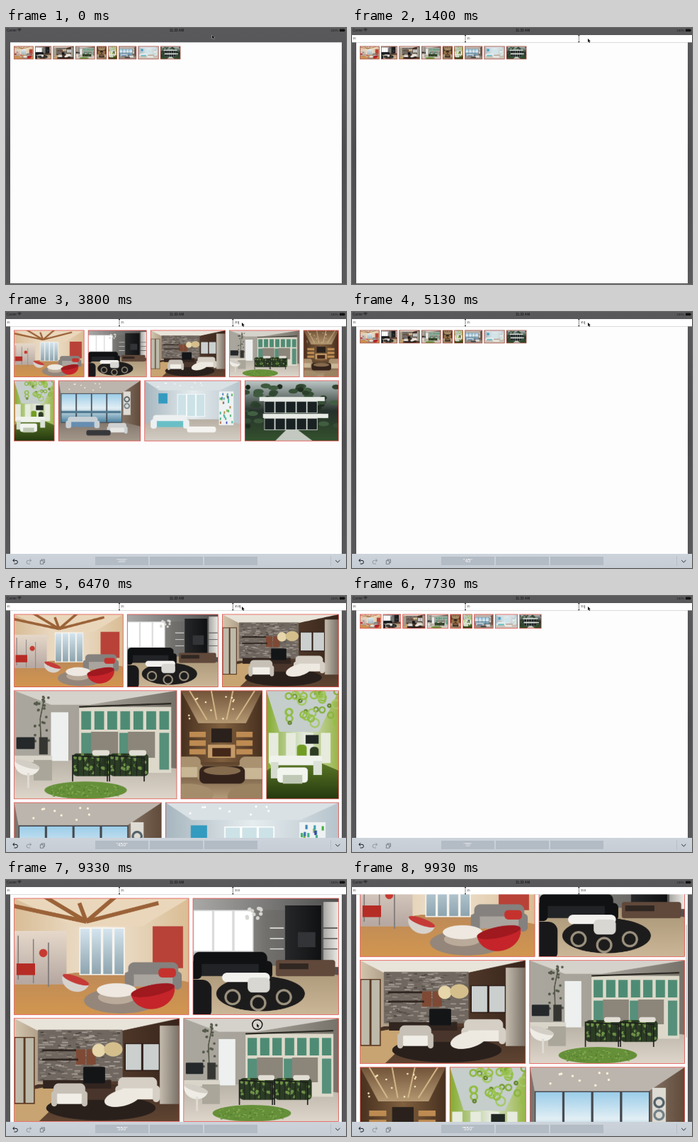
Animation of 480x362 px, one loop 9990 ms. Source, as an HTML page with a canvas:

```html
<!DOCTYPE html>
<html lang="en">
<head>
<meta charset="utf-8">
<title>Photo grid</title>
<style>
html, body { margin: 0; width: 100%; height: 100%; overflow: hidden; background: #555557; }
canvas { display: block; width: 480px; height: 362px; }
</style>
</head>
<body>
<canvas id="stage"></canvas>
<script>
const LOOP = 9990, DENSITY = Math.max(1, window.devicePixelRatio || 1);
const stage = document.getElementById('stage');
stage.width = 480 * DENSITY;
stage.height = 362 * DENSITY;
const screen = stage.getContext('2d');
let g = screen;

const clamp = v => Math.min(1, Math.max(0, v));
const ease = v => { v = clamp(v); return v * v * (3 - 2 * v); };
const mix = (a, b, k) => a + (b - a) * k;
const times = (n, fn) => { for (let i = 0; i < n; i++) fn(i); };

// drawing helpers, all acting on the current context
const box = (c, x, y, w, h) => { g.fillStyle = c; g.fillRect(x, y, w, h); };
const soft = (c, x, y, w, h, r) => {
  g.beginPath(); g.roundRect(x, y, w, h, r); g.fillStyle = c; g.fill();
};
const oval = (c, x, y, rx, ry = rx, tilt = 0) => {
  g.beginPath(); g.ellipse(x, y, rx, ry, tilt, 0, 7); g.fillStyle = c; g.fill();
};
const ring = (c, width, x, y, r, from = 0, to = 7) => {
  g.beginPath(); g.arc(x, y, r, from, to);
  g.strokeStyle = c; g.lineWidth = width; g.stroke();
};
const path = p => {
  g.beginPath();
  for (let i = 0; i < p.length; i += 2) g.lineTo(p[i], p[i + 1]);
};
const poly = (c, ...p) => { path(p); g.fillStyle = c; g.fill(); };
const line = (c, width, ...p) => { path(p); g.strokeStyle = c; g.lineWidth = width; g.stroke(); };
const shade = (x0, y0, x1, y1, ...colors) => {
  const s = g.createLinearGradient(x0, y0, x1, y1);
  colors.forEach((c, i) => s.addColorStop(i / (colors.length - 1), c));
  return s;
};
const text = (s, x, y, size, c, align = 'left', weight = 400) => {
  g.font = `${weight} ${size}px "Liberation Sans", Arial, sans-serif`;
  g.textAlign = align; g.textBaseline = 'middle'; g.fillStyle = c;
  g.fillText(s, x, y);
};
function scatter(n, x, y, w, h, draw) {
  let seed = 77;
  const random = () => (seed = seed * 16807 % 2147483647) / 2147483647;
  random();
  times(n, () => draw(x + random() * w, y + random() * h, random()));
}

// interiors: every picture is 100 units high
function shell(w, [l, r, top, base], ceiling, wall, floor) {
  box(shade(0, 0, w, 0, ...wall), 0, 0, w, 100);
  poly(ceiling, 0, 0, w, 0, r, top, l, top);
  poly(shade(0, base, 0, 100, ...floor), l, base, r, base, w, base + 8, w, 100, 0, 100, 0, base + 8);
}
function panes(n, frame, glass, x, y, w, h) {
  box(frame, x, y, w, h);
  const step = w / n;
  times(n, i => box(glass, x + i * step + 1, y + 1, step - 2, h - 2));
}
function sofa(c, seat, x, y, w, h) {
  soft(c, x + w * .06, y, w * .88, h * .7, h * .2);
  soft(seat, x + w * .1, y + h * .4, w * .8, h * .4, h * .12);
  soft(c, x, y + h * .3, w * .16, h * .6, h * .15);
  soft(c, x + w * .84, y + h * .3, w * .16, h * .6, h * .15);
}
function bowl(c, inner, x, y, r, tilt) {
  g.beginPath(); g.ellipse(x, y, r, r * .85, tilt, 0, Math.PI); g.fillStyle = c; g.fill();
  oval(inner, x, y, r, r * .25, tilt);
}
const lamps = (n, c, x, y, w, h, r = 1) => scatter(n, x, y, w, h, (a, b) => oval(c, a, b, r));

function redLoft(w) {
  shell(w, [52, 110, 24, 64], '#ead7bb', ['#d9bd96', '#f0e4d3', '#d9bd94'], ['#bd8a58', '#d2964f']);
  times(5, i => line('#9b6238', 3.5, 62, 20, i * 34 - 12, 4 - i % 2 * 8));
  box(shade(0, 25, 0, 72, '#e9dccd', '#b7a9a2'), 0, 28, 45, 46);
  times(3, i => box('#827d7b', 3 + i * 13, 32 + i * 3, 1, 38));
  box('#b52c25', 2, 56, 16, 10); oval('#c63a31', 25, 47, 3.5);
  panes(4, '#f8f5ef', shade(0, 26, 0, 66, '#d5e5ef', '#8ba2ac'), 56, 25, 39, 41);
  box('#b84238', 119, 24, 26, 36);
  oval('#94867a', 92, 88, 32, 11);
  sofa('#85817e', '#aaa49e', 95, 55, 49, 26);
  soft('#c5322e', 124, 60, 15, 8, 3);
  oval('#b9aa9a', 88, 85, 16, 6); oval('#eee8e1', 88, 79, 17, 6);
  bowl('#d8d2cd', '#c53a37', 53, 70, 12, .35);
  bowl('#c5242a', '#9f191f', 119, 79, 19, -.2);
}
function blackLounge(w) {
  shell(w, [0, 80, 10, 58], shade(0, 0, w, 0, '#aaa9a7', '#4c4c4b'), ['#c5c4c1', '#72716e', '#515150'], ['#a99677', '#cbb798']);
  panes(3, '#d9dadb', '#fff', 0, 10, 52, 36);
  box(shade(79, 0, 110, 0, '#272829', '#101112'), 79, 6, 31, 50);
  box(shade(112, 0, w, 0, '#a8a7a3', '#efede8'), 112, 3, 13, 56);
  times(3, i => { box('#ddd', 66, 25 + i * 9, 12, 1); box('#555', 112, 25 + i * 9, 12, 1); });
  box('#323437', 90, 29, 15, 13);
  soft('#60483a', 71, 53, 51, 14, 2); box('#302722', 74, 56, 25, 5);
  sofa('#101113', '#222326', -4, 46, 72, 26);
  oval('#1d1c1c', 58, 82, 38, 15);
  times(3, i => ring('#9c927f', 2, 34 + i * 22, 85 + i % 2 * 5, 6));
  soft('#18181a', -8, 70, 24, 34, 8);
  soft('#f2f1ee', 25, 64, 41, 8, 4); soft('#d9d7d2', 47, 68, 19, 13, 4);
  lamps(11, '#d7d6d2', 46, 8, 18, 9, 1.6);
}
function stoneDen(w) {
  shell(w, [23, 104, 12, 64], '#e9e4da', ['#d4c6ae', '#59402f', '#37241b'], ['#443126', '#604532']);
  poly('#c7a471', 0, 72, 34, 66, 55, 70, 24, 100, 0, 100);
  panes(2, '#5a3823', '#bdbaaa', 0, 18, 20, 65);
  box('#706860', 23, 11, 82, 50);
  scatter(260, 23, 11, 78, 48, (x, y, r) => box(`hsl(30 8% ${24 + r * 40}%)`, x, y, 3 + r * 3, 1.2));
  panes(2, '#2b1a13', '#cbd0cf', 107, 24, 34, 27);
  box(shade(141, 0, w, 0, '#c5bcae', '#777066'), 141, 7, 20, 76);
  times(2, i => { box('#302621', 27, 30 + i * 9, 35, 2); box('#7e4a35', 60 + i * 10, 30, 9, 15); });
  box('#322520', 28, 60, 66, 8); soft('#141517', 67, 47, 21, 16, 1);
  oval('#e6d6aa', 82, 31, 6.5); oval('#d4bf8c', 96, 30, 9, 7);
  oval('#29201c', 84, 87, 53, 12);
  soft('#49352b', 66, 69, 34, 10, 3);
  sofa('#d5cfc5', '#eeeae2', 98, 57, 43, 27);
  sofa('#c7c0b6', '#f1eee8', 36, 63, 35, 25);
  oval('#eee9e0', 105, 77, 18, 8, -.25);
}
function greenBedroom(w) {
  shell(w, [34, 70, 13, 64], '#d5d2cb', ['#aaa79f', '#a6a198', '#767269'], ['#b9b2a7', '#ded6ca']);
  box('#edf0ee', 34, 20, 16, 45);
  line('#4c4c3d', 1, 25, 55, 24, 26, 28, 6);
  scatter(24, 19, 5, 13, 42, (x, y) => oval('#55594a', x, y, 1.2));
  box('#ddd9ca', 60, 15, 85, 61); line('#2b2923', 1.5, 60, 15, 145, 12);
  times(7, i => box('#4e8b74', 62 + i * 12, 19, 9, 17));
  for (const x of [62, 97, 134]) box('#568f7a', x, 39, 9, 34);
  times(2, i => {
    const x = 54 + i * 34;
    box('#8b857a', x + 17, 38, 25, 24);
    soft('#2b3c24', x, 58, 36, 21, 4);
    scatter(45, x + 2, 59, 32, 17, (a, b, r) => oval(r > .5 ? '#6d9148' : '#263620', a, b, 1.5));
    soft('#e2ded5', x + 18, 55, 16, 5, 2);
    times(7, n => line('#20211e', .7, x + n * 5, 61, x + n * 5, 79));
    line('#1c1d1a', 1.1, x, 84, x, 60, x + 32, 62, x + 32, 84);
  });
  box('#d9d5c9', 0, 60, 35, 6); box('#aaa69a', 18, 64, 17, 19);
  soft('#24282a', 2, 43, 17, 11, 1); box('#353632', 23, 43, 8, 16);
  bowl('#eeece5', '#d2cec5', 12, 68, 12, .3); box('#dedbd4', 12, 76, 2, 14);
  oval('#659039', 66, 92, 38, 8);
  scatter(90, 34, 87, 62, 10, (x, y, r) => box(r > .5 ? '#83a951' : '#557d2e', x, y, 1.5, 1));
}
function amberHall(w) {
  shell(w, [16, 60, 30, 66], shade(0, 0, 0, 30, '#715338', '#b49872'), ['#47301f', '#80603f', '#47301f'], ['#5e432c', '#b49d7b']);
  times(4, i => line('#d6b98a', 1.2, 8 + i * 20, 0, 24 + i * 9, 27));
  lamps(12, '#fff0c4', 6, 4, 62, 22, .8);
  for (const x of [8, 51]) times(3, i => box('#bd8b52', x, 38 + i * 8, 15, 5));
  box('#2a211c', 28, 35, 19, 13); box('#c49b68', 25, 50, 25, 12); box('#432719', 29, 53, 17, 8);
  sofa('#a99170', '#c8b694', -10, 61, 30, 24); sofa('#aa9271', '#c9b695', 52, 61, 34, 26);
  soft('#33231b', 17, 70, 42, 16, 5); oval('#856b4d', 38, 74, 17, 4);
  oval('#a58d6c', 6, 96, 24, 10); oval('#9a815f', 67, 98, 24, 12);
}
function greenOffice(w) {
  shell(w, [12, 48, 38, 66], '#c5cecb', ['#83ab2d', '#dfe6d7', '#97b446'], ['#5b7826', '#24380f']);
  scatter(32, 20, 0, 46, 30, (x, y, r) => ring(`hsl(82 48% ${32 + r * 28}%)`, 1.5, x, y, 1 + r * 3));
  times(4, i => box('#e6ebdd', i * 16 + 2, 39, 9, 28));
  box('#202723', 36, 41, 12, 8);
  soft('#729d24', 28, 50, 9, 14, 3); soft('#2e3c22', 40, 52, 8, 13, 3);
  soft('#f0f3ec', 3, 60, 48, 9, 2); box('#d5dcce', 4, 66, 7, 15); box('#dce2d7', 43, 65, 8, 13);
  soft('#f2f4ee', 10, 71, 28, 14, 3); box('#bfc8b4', 15, 78, 18, 8);
}
function seaView(w) {
  shell(w, [4, 104, 21, 68], '#bcb5ad', ['#77746f', '#aaa49c', '#614a39'], ['#83776d', '#a5988b']);
  lamps(9, '#fff4dc', 16, 4, 78, 12);
  panes(4, '#42454b', shade(0, 22, 0, 69, '#9bcde9', '#e2eff5', '#4c829f'), 4, 21, 101, 49);
  box('#4f7890', 5, 50, 98, 4);
  box('#dedbd4', 107, 18, 12, 39); ring('#506069', 2, 113, 31, 4); ring('#718087', 2, 113, 42, 4);
  sofa('#c8d0d5', '#668db1', 12, 60, 56, 21); sofa('#cfd1d1', '#e6e6e4', 80, 70, 34, 20);
  soft('#37383b', 46, 82, 40, 9, 3);
}
function whiteStudio(w) {
  shell(w, [24, 124, 16, 64], '#d9e1e5', ['#a7b6bf', '#e6edef', '#b7c4cc'], ['#b9b0a4', '#d4cec5']);
  lamps(9, '#fff', 20, 3, 110, 8);
  box('#339bc0', 23, 21, 15, 17);
  panes(3, '#fff', '#cce2e7', 54, 22, 46, 38);
  box('#eef2f3', 123, 18, 24, 56);
  scatter(28, 124, 20, 20, 48, (x, y, r) => box(`hsl(${r * 240} 48% 46%)`, x, y, 2, 4));
  sofa('#edf0f1', '#69bfc7', 10, 57, 64, 25); soft('#f4f3f0', 70, 76, 48, 10, 4);
}
function darkVilla(w) {
  box(shade(0, 0, 0, 100, '#bdc8c7', '#26312b', '#34522e'), 0, 0, w, 100);
  scatter(60, 0, 8, w, 68, (x, y, r) => oval(`hsl(120 18% ${12 + r * 20}%)`, x, y, 4 + r * 5, 4));
  times(2, i => {
    box('#e8ebe6', 24 + i * 6, 27 + i * 28, 108, 7);
    panes(5, '#dadfd9', '#192122', 32, 34 + i * 28, 88, 20);
  });
  poly('#c3c8c0', 50, 100, 68, 82, 88, 82, 112, 100);
}

const rooms = [
  [redLoft, 1.5], [blackLounge, 1.25], [stoneDen, 1.6], [greenBedroom, 1.5], [amberHall, .75],
  [greenOffice, .665], [seaView, 1.355], [whiteStudio, 1.59], [darkVilla, 1.55]
].map(([paint, ratio]) => {
  const image = document.createElement('canvas');
  image.width = 300 * ratio; image.height = 300;
  g = image.getContext('2d');
  g.scale(3, 3);
  paint(100 * ratio);
  return { image, ratio };
});
g = screen;

// layouts: one small row, or rows stretched to the full width
const LEFT = 11.5, TOP = 26, WIDE = 458;
function placeRow(row, y, height, gap) {
  let x = LEFT;
  return row.map(({ ratio }) => {
    const cell = [x, y, ratio * height, height];
    x += ratio * height + gap;
    return cell;
  });
}
function justified(counts) {
  let y = TOP, first = 0;
  return counts.flatMap(n => {
    const row = rooms.slice(first, first += n);
    const h = (WIDE - 6 * (n - 1)) / row.reduce((sum, r) => sum + r.ratio, 0);
    const cells = placeRow(row, y, h, 6);
    y += h + 5.3;
    return cells;
  });
}

// each round types a height, shows the grid, then erases the number again
const round = (word, start, pace, erase, thumb, counts) => ({
  word, start, pace, erase, full: start + pace * 2,
  small: placeRow(rooms, TOP, thumb, 3), large: justified(counts)
});
const rounds = [
  round('200', 2470, 250, 3800, 17.9, [5, 4]),
  round('450', 4400, 465, 6600, 17.9, [3, 3, 2, 1]),
  round('550', 7330, 320, Infinity, 19.7, [2, 2, 3, 2])
];
const roundAt = t => rounds.findLast(r => r.start <= t) || rounds[0];
function valueAt(t) {
  const { word, start, pace, erase } = roundAt(t);
  const typed = Math.min(word.length, Math.floor((t - start) / pace) + 1);
  const erased = Math.max(0, Math.floor((t - erase) / 170) + 1);
  return word.slice(0, Math.max(0, typed - erased));
}

function drawGallery(t, scroll) {
  const { small, large, full, erase } = roundAt(t);
  const grown = ease((t - full) / 330) - ease((t - erase) / 330);
  g.save();
  g.beginPath(); g.rect(6, 20, 468, 341); g.clip();
  g.imageSmoothingQuality = 'high';
  rooms.forEach(({ image }, n) => {
    const [x, y, w, h] = small[n].map((v, j) => mix(v, large[n][j], grown));
    g.drawImage(image, x, y - scroll, w, h);
    g.strokeStyle = h > 19 ? '#e4504a' : '#a54a3c';
    g.lineWidth = .8;
    g.strokeRect(x, y - scroll, w, h);
  });
  g.restore();
}

function drawStatus() {
  text('Carrier', 1, 3.4, 4.6, '#1d1d1f');
  times(3, i => ring('#1d1d1f', .8, 19, 5, 1.2 + i * 1.4, -2.35, -.8));
  text('11:33 AM', 241, 3.4, 4.6, '#1d1d1f', 'center', 700);
  text('100%', 469.5, 3.4, 4.4, '#1d1d1f', 'right');
  soft('#111', 471, 1.5, 7, 3.6, .6); box('#111', 478.3, 2.5, .7, 1.6);
}

function drawFields(t) {
  const value = valueAt(t);
  g.globalAlpha = ease((t - 930) / 350);
  box('#fff', 0, 10, 480, 10.3);
  ['15', '15', value].forEach((s, i) => {
    text(s, i * 161 + 1, 15.3, 4.2, '#333');
    if (!i) return;
    const x = i * 160.3 - .3;
    box('#707072', x - .4, 10, .8, 10);
    for (const y of [10, 19]) box('#333', x - 1, y, 2, 1.2);
  });
  const blink = t < 2470 ? t > 1800 && t < 2270 : t < 9270;
  if (blink) box('#444', 323.4 + value.length * 2.34, 13, .7, 4.5);
  g.globalAlpha = 1;
}

function hookArrow(x, dir, c) {
  g.save();
  g.translate(x, 351.3); g.scale(dir, 1);
  line(c, 1, -3, 0, 1, 0);
  ring(c, 1, 1, 2.4, 2.4, -Math.PI / 2, Math.PI / 2);
  line(c, 1, 1, 4.8, -1.5, 4.8);
  line(c, 1, -1, -2.2, -3.3, 0, -1, 2.2);
  g.restore();
}

function drawKeyboardBar(t) {
  const up = ease((t - 2470) / 260);
  if (!up) return;
  g.save();
  g.translate(0, 20 * (1 - up));
  box(shade(0, 342, 0, 361, '#ccd3da', '#c6cdd5'), 0, 342, 480, 20);
  times(3, i => box('#b3bbc4', 126 + i * 77, 346, 75, 12));
  const hints = new Set([valueAt(t), valueAt(t - 120)]);
  g.globalAlpha = 1 / hints.size;
  for (const s of hints) if (s) text(`"${s}"`, 163.5, 352.2, 6.8, '#fff', 'center');
  g.globalAlpha = 1;
  hookArrow(13, 1, '#17191b');
  hookArrow(32.5, -1, '#8e969f');
  times(2, i => {
    box('#c9d0d7', 50 - i * 1.7, 350 + i * 1.8, 4.5, 4.5);
    g.strokeStyle = '#69717a'; g.lineWidth = .8;
    g.strokeRect(50 - i * 1.7, 350 + i * 1.8, 4.5, 4.5);
  });
  box('#b0b7bf', 458, 345, .7, 14);
  line('#25282b', 1, 465.2, 351, 468.3, 354, 471.4, 351);
  g.restore();
}

const moves = [
  { at: 70, lasts: 130, x: 238, y: 25 }, { at: 200, lasts: 130, x: 279, y: 11 },
  { at: 930, lasts: 370, x: 333, y: 15 }, { at: 8600, lasts: 600, x: 354, y: 203 }
];
function drawPointer(t, scroll) {
  if (t > 9750) return;
  let x = 291, y = 10;
  for (const m of moves) {
    const k = ease((t - m.at) / m.lasts);
    x = mix(x, m.x, k);
    y = mix(y, m.y, k);
  }
  g.save();
  g.translate(x, y - scroll);
  if (t >= 9270) ring('#161616', 1.5, .8, 1.5, 7);
  path([0, 0, 0, 5, 1.1, 4, 2, 6, 3, 5.5, 2.1, 3.7, 3.6, 3.6]);
  g.closePath();
  g.strokeStyle = '#ddd'; g.lineWidth = .8; g.stroke();
  g.fillStyle = '#111'; g.fill();
  g.restore();
}

function draw(now) {
  const t = now % LOOP;
  const scroll = 82 * clamp((t - 9370) / 560);
  g.setTransform(DENSITY, 0, 0, DENSITY, 0, 0);
  box(shade(0, 0, 0, 362, '#59595b', '#4d4d4f', '#59595b'), 0, 0, 480, 362);
  box('#fdfdfe', 6, 20.3, 468, 340.7);
  drawGallery(t, scroll);
  if (scroll) soft('rgba(60,60,64,.3)', 471.5, 22 + scroll * .5, 1.4, 160, .7);
  drawStatus();
  drawFields(t);
  drawKeyboardBar(t);
  drawPointer(t, scroll);
}

const began = performance.now();
(function tick() {
  draw(performance.now() - began);
  requestAnimationFrame(tick);
})();
</script>
</body>
</html>
```
